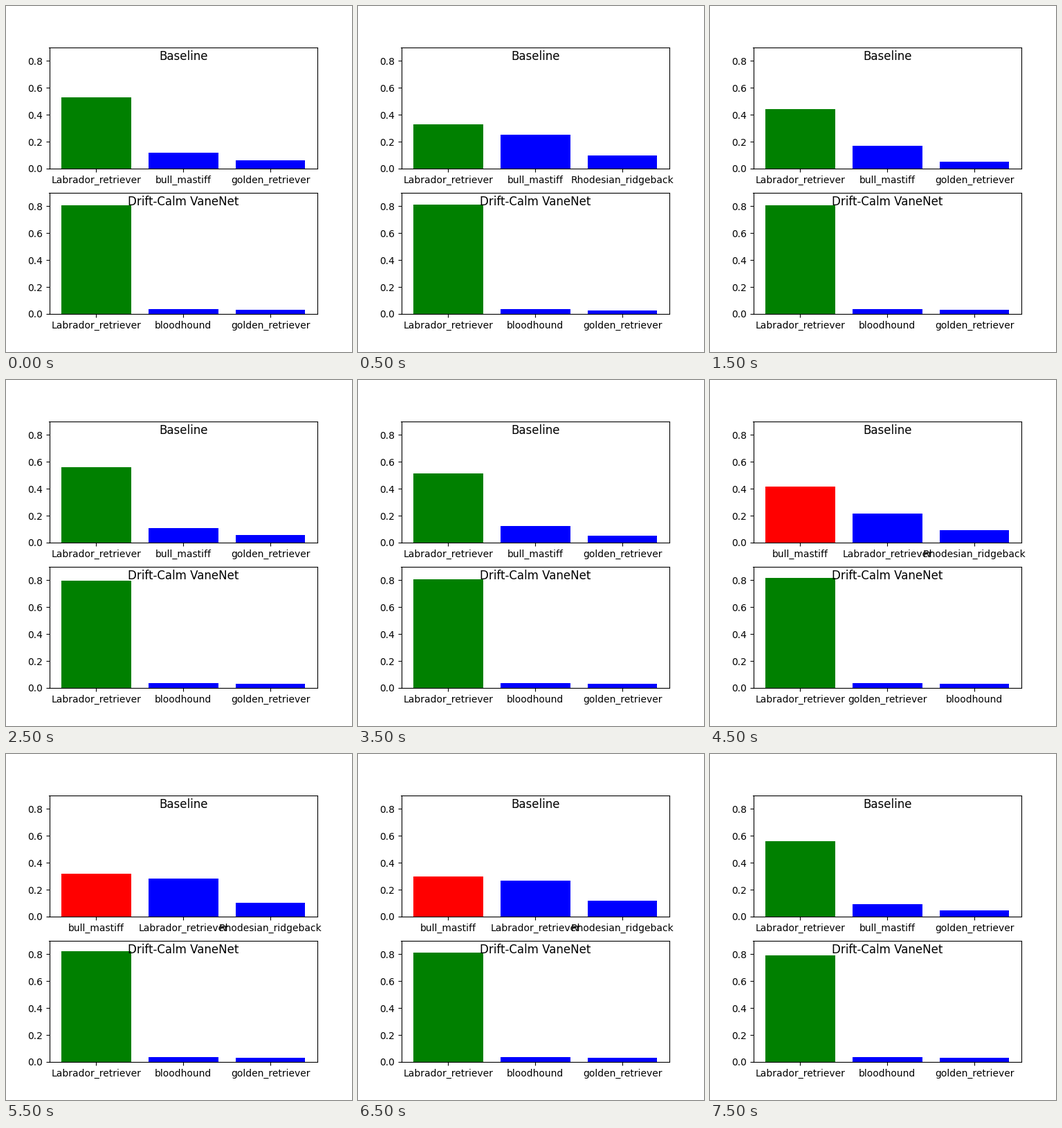
A matplotlib script for the animation above (8000 ms loop, 500 px wide and 500 px high).

```python
import matplotlib.pyplot as plt
from matplotlib.animation import FuncAnimation

PAPER, GREEN, RED, BLUE = "#ffffff", "#008000", "#ff0000", "#0000ff"
LAB, BULL, GOLD = "Labrador_retriever", "bull_mastiff", "golden_retriever"
RIDGE, BLOOD = "Rhodesian_ridgeback", "bloodhound"
TRUTH = LAB

# Label orders
A = (LAB, BULL, GOLD)
B = (LAB, BULL, RIDGE)
C = (BULL, LAB, RIDGE)
D = (LAB, BLOOD, GOLD)
E = (LAB, GOLD, BLOOD)

# One step per half second: labels, then the three probabilities
BASELINE = [
    (A, .530, .118, .062), (B, .330, .250, .100),
    (B, .355, .235, .095), (A, .442, .170, .051),
    (A, .520, .125, .055), (A, .560, .108, .055),
    (B, .380, .215, .080), (A, .514, .123, .051),
    (B, .370, .230, .085), (C, .417, .216, .0926),
    (B, .334, .270, .100), (C, .319, .283, .103),
    (C, .365, .250, .110), (C, .298, .267, .118),
    (B, .458, .165, .070), (A, .560, .0926, .046),
]
STEADY = [
    (D, .8075, .036, .031), (D, .812, .036, .026),
    (D, .812, .036, .031), (D, .8075, .036, .031),
    (D, .797, .036, .031), (D, .797, .036, .031),
    (D, .803, .036, .026), (D, .8075, .036, .031),
    (D, .810, .036, .026), (E, .818, .036, .031),
    (E, .826, .036, .026), (D, .823, .036, .031),
    (D, .818, .036, .031), (D, .811, .036, .031),
    (D, .801, .040, .031), (D, .792, .036, .031),
]

fig, axes = plt.subplots(2, 1, figsize=(5, 5), dpi=100, facecolor=PAPER)


def make_panel(ax, title):
    ax.set_facecolor(PAPER)
    bars = ax.bar(range(3), [0.1] * 3, color=BLUE)
    ax.set_ylim(0, 0.9)
    ax.set_title(title, y=0.85)
    return ax, bars


panels = [
    (*make_panel(axes[0], "Baseline"), BASELINE),
    (*make_panel(axes[1], "Drift-Calm VaneNet"), STEADY),
]


def update(i):
    for ax, bars, steps in panels:
        labels, *probs = steps[i]
        for bar, p in zip(bars, probs):
            bar.set_height(p)
        bars[0].set_facecolor(GREEN if labels[0] == TRUTH else RED)
        ax.set_xticks(range(3), labels)
    return []


anim = FuncAnimation(fig, update, frames=len(BASELINE), interval=500,
                     init_func=lambda: update(0), repeat=True, repeat_delay=0)
plt.show()
```
